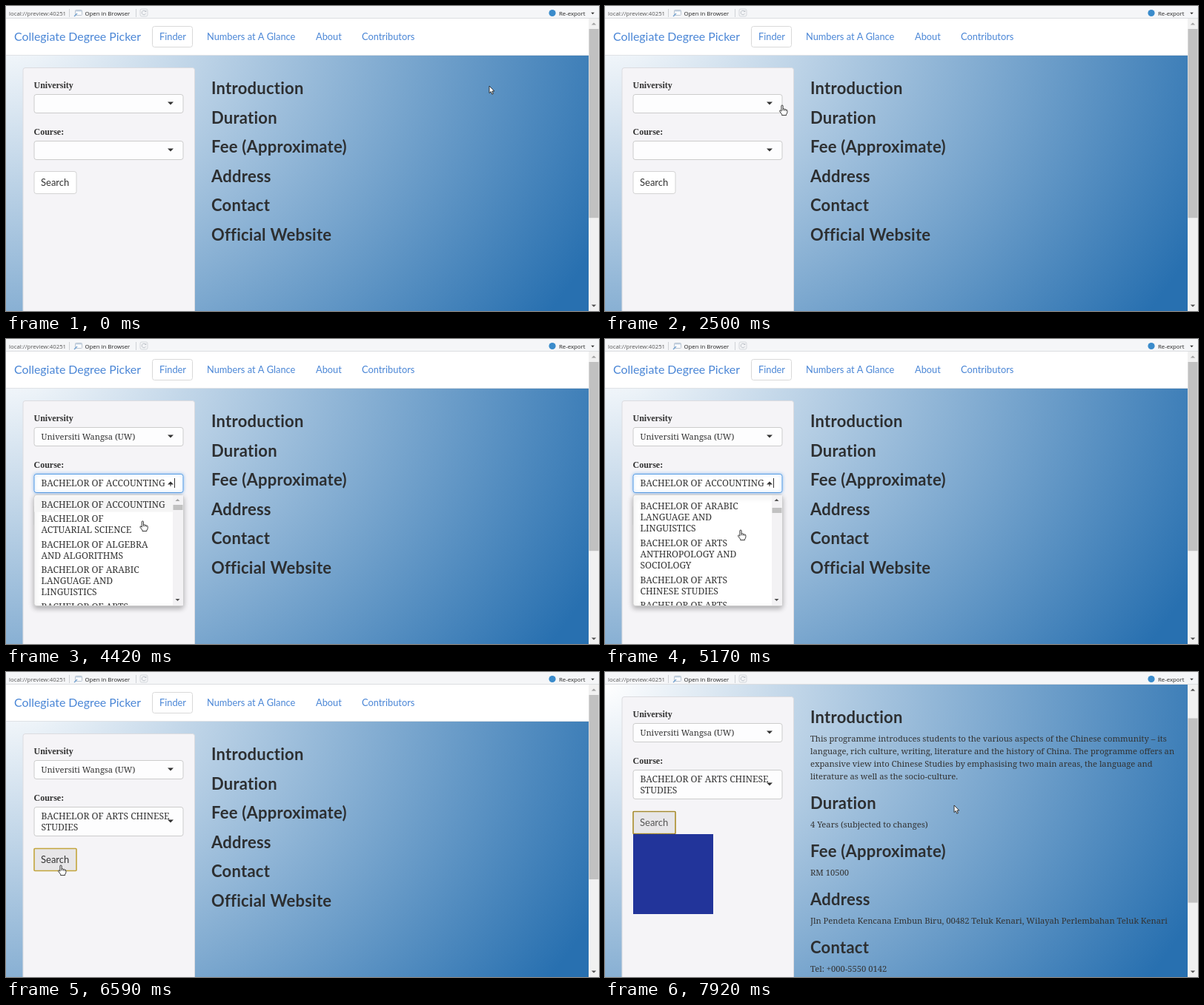
Recreate the animation shown at these times as an HTML page with a canvas. Size 800x412 px, loop 8 s.

```html
<!DOCTYPE html>
<html lang="en">
<head>
<meta charset="utf-8">
<title>Course search</title>
<style>
html, body { margin: 0; width: 100%; height: 100%; overflow: hidden; background: #fff; }
canvas { display: block; width: 800px; height: 412px; }
</style>
</head>
<body>
<canvas id="stage"></canvas>
<script>
const W = 800, H = 412, TOP = 17, VIEW = 786;
const LOOP = 8000, STEP = 250 / 3;
const canvas = document.getElementById('stage');
const ctx = canvas.getContext('2d');
const ratio = window.devicePixelRatio || 1;
canvas.width = W * ratio;
canvas.height = H * ratio;

const SANS = 'Lato, sans-serif';
const UI = '7.8px "Open Sans", sans-serif';
const SERIF = '"Noto Serif", serif';
const BODY = '11.2px ' + SERIF, ITEM = '11.1px ' + SERIF, CAPS = '12.1px ' + SERIF;
const NAV = '12.8px ' + SANS, BUTTON = '13px ' + SANS;
const LABEL = 'bold 12px "Liberation Serif", serif';
const LINK = '#4a86d6', INK = '#333';

// Moments of the visit, in ms
const AT = {
  openUni: 2660, pickUni: 3700, fillCourse: 3900, openCourse: 4150,
  wheel1: 4740, wheel2: 4910, hoverCourse: 5320, pickCourse: 5650,
  hoverButton: 6200, press: 6490, results: 6910, scroll1: 7820, scroll2: 7900
};

// Pointer stops: time, x, y, shape from then on
const STOPS = [
  [0, 652, 108, 'arrow'], [250, 652, 108, 'arrow'], [1900, 300, 128, 'arrow'],
  [2230, 243, 133, 'hand'], [2417, 239, 134, 'hand'], [2750, 239, 134, 'hand'],
  [3500, 191, 159, 'hand'], [3700, 191, 159, 'hand'], [4080, 190, 194, 'hand'],
  [4200, 190, 194, 'hand'], [4500, 183, 258, 'hand'], [5250, 183, 258, 'hand'],
  [5550, 150, 333, 'hand'], [5700, 150, 333, 'arrow'], [6170, 82, 267, 'hand'],
  [6330, 74, 261, 'hand'], [6830, 74, 261, 'arrow'], [7330, 470, 188, 'beam'],
  [7417, 478, 186, 'beam'], [7820, 478, 186, 'arrow'], [7910, 471, 180, 'arrow'],
  [8000, 471, 180, 'arrow']
];

const UNIS = [
  ['Universiti Wangsa (UW)'],
  ['Universiti Bayu', 'Selendang(UBS)'],
  ['Universiti Gemerlapan', 'Lembayung (UGL)'],
  ['Universiti Jentera Gelombang', '(UJG)'],
  ['Universiti Purnama', 'Kerikil(UPK)']
];
const COURSES = [
  ['BACHELOR OF ACCOUNTING'],
  ['BACHELOR OF', 'ACTUARIAL SCIENCE'],
  ['BACHELOR OF ALGEBRA', 'AND ALGORITHMS'],
  ['BACHELOR OF ARABIC', 'LANGUAGE AND', 'LINGUISTICS'],
  ['BACHELOR OF ARTS', 'ANTHROPOLOGY AND', 'SOCIOLOGY'],
  ['BACHELOR OF ARTS', 'CHINESE STUDIES'],
  ['BACHELOR OF ARTS', 'EAST ASIAN STUDIES']
];
const CHOSEN = ['BACHELOR OF ARTS CHINESE', 'STUDIES'];

const SECTIONS = [
  ['Introduction', [
    'This programme introduces students to the various aspects of the Chinese community – its',
    'language, rich culture, writing, literature and the history of China. The programme offers an',
    'expansive view into Chinese Studies by emphasising two main areas, the language and',
    'literature as well as the socio-culture.']],
  ['Duration', ['4 Years (subjected to changes)']],
  ['Fee (Approximate)', ['RM 10500']],
  ['Address', ['Jln Pendeta Kencana Embun Biru, 00482 Teluk Kenari, Wilayah Perlembahan Teluk Kenari']],
  ['Contact', ['Tel: +000-5550 0142']],
  ['Official Website', []]
];

function text(str, x, y, font, color = INK, spacing = 0) {
  ctx.font = font;
  ctx.letterSpacing = spacing + 'px';
  ctx.fillStyle = color;
  ctx.fillText(str, x, y);
}

function rect(x, y, w, h, color) {
  ctx.fillStyle = color;
  ctx.fillRect(x, y, w, h);
}

function box(x, y, w, h, fill, stroke, line = 1, r = 3) {
  ctx.beginPath();
  ctx.roundRect(x + 0.5, y + 0.5, w - 1, h - 1, r);
  ctx.fillStyle = fill;
  ctx.fill();
  ctx.strokeStyle = stroke;
  ctx.lineWidth = line;
  ctx.stroke();
}

// dir 1 points down, -1 points up
function triangle(x, y, dir, half, color) {
  ctx.beginPath();
  ctx.moveTo(x - half, y - dir * half / 2);
  ctx.lineTo(x + half, y - dir * half / 2);
  ctx.lineTo(x, y + dir * half / 2);
  ctx.fillStyle = color;
  ctx.fill();
}

function clipped(x, y, w, h, draw) {
  ctx.save();
  ctx.beginPath();
  ctx.rect(x, y, w, h);
  ctx.clip();
  draw();
  ctx.restore();
}

// Elliptical glow from the top left corner, fixed while the page scrolls
function drawBackdrop() {
  ctx.save();
  ctx.translate(0, TOP);
  ctx.scale(VIEW, 640);
  const g = ctx.createRadialGradient(0, 0, 0, 0, 0, 1.12);
  g.addColorStop(0, '#ffffff');
  g.addColorStop(1, '#2870b0');
  ctx.fillStyle = g;
  ctx.fillRect(0, 0, 1, 1);
  ctx.restore();
}

function drawToolbar() {
  rect(0, 0, W, TOP, '#f5f6f8');
  rect(0, TOP - 1, W, 1, '#dcdee1');
  text('local://preview:40251', 4, 13, UI, '#555');
  rect(85, 4, 1, 11, '#cfd2d6');
  rect(175, 4, 1, 11, '#cfd2d6');
  box(93, 5, 10, 8, '#fdfdfe', '#a9b7c6', 0.8, 1);
  rect(94, 6, 8, 1.5, '#c4d3e4');
  ctx.strokeStyle = '#6f9fd0';
  ctx.lineWidth = 1.2;
  ctx.beginPath();
  ctx.moveTo(92, 14);
  ctx.lineTo(96, 10);
  ctx.stroke();
  text('Open in Browser', 106.5, 13, UI, '#222');
  box(180.5, 3.5, 11, 11, '#f3f4f6', '#cdd1d6', 0.8, 2);
  ctx.strokeStyle = '#b3b9c0';
  ctx.beginPath();
  ctx.arc(186, 9, 2.8, 0.4, 5.4);
  ctx.stroke();
  triangle(188.3, 7.4, 1, 1.7, '#b3b9c0');
  ctx.beginPath();
  ctx.arc(737, 9.5, 4.6, 0, Math.PI * 2);
  ctx.fillStyle = '#3a8bcb';
  ctx.fill();
  text('Re-export', 746, 13, UI, '#222');
  triangle(791.5, 10, 1, 2.3, '#333');
}

function drawNav() {
  rect(0, TOP, VIEW, 49, '#fff');
  rect(0, 66, VIEW, 1, '#dfe2e6');
  text('Collegiate Degree Picker', 11, 47, '15.9px ' + SANS, LINK);
  box(197, 27, 55, 29, '#fff', '#d9d9d9');
  [['Finder', 207], ['Numbers at A Glance', 271], ['About', 418], ['Contributors', 480]]
    .forEach(([label, x]) => text(label, x, 46, NAV, LINK));
}

function drawSelect(y, lines, font, open) {
  const h = lines.length > 1 ? 40 : 26;
  if (open) {
    ctx.save();
    ctx.shadowColor = 'rgba(90,160,235,.6)';
    ctx.shadowBlur = 4;
    box(37.5, y, 202, h, '#fff', '#5b9fe6');
    ctx.restore();
  } else {
    box(37.5, y, 202, h, '#fdfdfe', '#ccc');
  }
  lines.forEach((s, i) => text(s, 47.5, y + 17 + 15 * i, font));
  triangle(222, y + h / 2 - 0.5, open ? -1 : 1, 4, INK);
}

function drawList(y, items, font, scroll, active, thumbY, thumbH) {
  ctx.save();
  ctx.shadowColor = 'rgba(0,0,0,.3)';
  ctx.shadowBlur = 7;
  ctx.shadowOffsetY = 3;
  box(37.5, y, 202, 151, '#fff', '#d0d0d0');
  ctx.restore();
  clipped(38, y + 1, 201, 149, () => {
    let top = y + 4 - scroll;
    items.forEach((lines, i) => {
      const h = 4.6 + 15 * lines.length;
      if (i === active) rect(38, top, 187, h, '#f5f5f5');
      lines.forEach((s, k) => text(s, 47.5, top + 13.6 + 15 * k, font));
      top += h;
    });
    rect(225, y + 1, 14, 149, '#f3f2f4');
    rect(225.5, y + thumbY, 13, thumbH, '#c1c1c1');
    triangle(231.5, y + 7.5, -1, 3, scroll ? '#505050' : '#a3a3a3');
    triangle(231.5, y + 142.5, 1, 3, '#505050');
  });
}

function drawButton(t, y) {
  const hover = t >= AT.hoverButton, focus = t >= AT.press;
  const edge = focus ? '#c3a53c' : hover ? '#adadad' : '#d3d3d3';
  box(37.5, y, 58, 31, hover ? '#e7e6e8' : '#fff', edge, focus ? 1.6 : 1, focus ? 1 : 3);
  if (t >= AT.results) {
    ctx.setLineDash([1, 1]);
    ctx.strokeStyle = '#7d6a26';
    ctx.lineWidth = 1;
    ctx.strokeRect(38, y + 0.5, 57, 30);
    ctx.setLineDash([]);
  }
  text('Search', 47, y + 20, BUTTON, t >= AT.results ? '#555' : INK);
}

function drawPanel(t) {
  const uniOpen = t >= AT.openUni && t < AT.pickUni;
  const courseOpen = t >= AT.openCourse && t < AT.pickCourse;
  const picked = t >= AT.pickCourse;
  const uni = t >= AT.pickUni ? UNIS[0] : [];
  const course = picked ? CHOSEN : t >= AT.fillCourse ? COURSES[0] : [];

  box(22.5, 83, 232.5, 460, '#f5f4f7', '#dcdce0');
  text('University', 37.5, 111, LABEL);
  drawSelect(119, uni, ITEM, uniOpen);
  text('Course:', 37.5, 174, LABEL);
  drawSelect(182, course, CAPS, courseOpen);
  drawButton(t, picked ? 238 : 223);
  if (t >= AT.results) rect(38, 269, 108, 108, '#22349a');

  if (uniOpen) drawList(147, UNIS, ITEM, 0, 0, 14, 33);
  if (courseOpen) {
    const wheel = t >= AT.wheel2 ? 2 : t >= AT.wheel1 ? 1 : 0;
    rect(221.5, 195, 1, 4, INK);
    rect(227, 188, 1, 13, INK);
    drawList(210, COURSES, CAPS, 43 * wheel, t >= AT.hoverCourse ? 5 : 0, 14 + 2 * wheel, 7);
  }
}

function drawSections(filled) {
  let y = 119;
  SECTIONS.forEach(([title, lines]) => {
    text(title, 277, y, 'bold 22px ' + SANS, '#2d2f31', 0.25);
    if (filled) {
      lines.forEach((s, i) => text(s, 277, y + 25 + 17 * i, BODY));
      y += 48 + 17 * lines.length;
    } else {
      y += 39.5;
    }
  });
}

function drawScrollbar(scroll, tall) {
  const page = tall ? 582 : 568, k = 367 / page;
  rect(VIEW, TOP, 14, H - TOP, '#f1f1f1');
  rect(VIEW + 0.5, 31 + scroll * k, 13, 395 * k, '#c1c1c1');
  triangle(793, 24, -1, 3.2, scroll ? '#505050' : '#a3a3a3');
  triangle(793, 405, 1, 3.2, '#505050');
}

const ARROW = new Path2D('M0 0V9.6L2.2 7.6L3.8 11.2L5.4 10.5L3.9 7H6.8Z');
const HAND = new Path2D('M-1.1 1Q-1 0 0 0Q1 0 1.1 1V5Q2.8 4.3 3.3 5.5Q4.8 5 5.2 6.2Q6.9 6 6.9 7.4V9.6Q6.7 11.3 5.6 12.2V13.6H-.4V12.3L-3.4 8.3Q-3.7 7 -2.5 7L-1.1 8.2Z');
const KNUCKLES = new Path2D('M1.1 5V7.4M3.3 5.7V7.5M5.2 6.4V7.7');
const BEAM = new Path2D('M-2.5 -5.5H-.7L0 -5L.7 -5.5H2.5M0 -5V5M-2.5 5.5H-.7L0 5L.7 5.5H2.5');

function drawPointer(t) {
  let i = 0;
  while (i < STOPS.length - 2 && STOPS[i + 1][0] <= t) i++;
  const [t0, x0, y0, shape] = STOPS[i], [t1, x1, y1] = STOPS[i + 1];
  const u = (t - t0) / (t1 - t0), e = u * u * (3 - 2 * u);
  ctx.save();
  ctx.translate(x0 + (x1 - x0) * e, y0 + (y1 - y0) * e);
  ctx.strokeStyle = '#222';
  ctx.lineWidth = shape === 'beam' ? 1.2 : 0.9;
  if (shape === 'beam') {
    ctx.stroke(BEAM);
  } else {
    const path = shape === 'hand' ? HAND : ARROW;
    ctx.fillStyle = '#fff';
    ctx.fill(path);
    ctx.stroke(path);
    if (shape === 'hand') ctx.stroke(KNUCKLES);
  }
  ctx.restore();
}

function draw(t) {
  const scroll = t >= AT.scroll2 ? 50 : t >= AT.scroll1 ? 22 : 0;
  ctx.setTransform(ratio, 0, 0, ratio, 0, 0);
  drawBackdrop();
  clipped(0, TOP, VIEW, H - TOP, () => {
    ctx.translate(0, -scroll);
    drawNav();
    drawSections(t >= AT.results);
    drawPanel(t);
  });
  drawScrollbar(scroll, t >= AT.pickCourse);
  drawToolbar();
  drawPointer(t);
}

const start = performance.now();
function tick() {
  const t = (performance.now() - start) % LOOP;
  draw(Math.floor(t / STEP) * STEP);
  requestAnimationFrame(tick);
}
tick();
</script>
</body>
</html>
```
